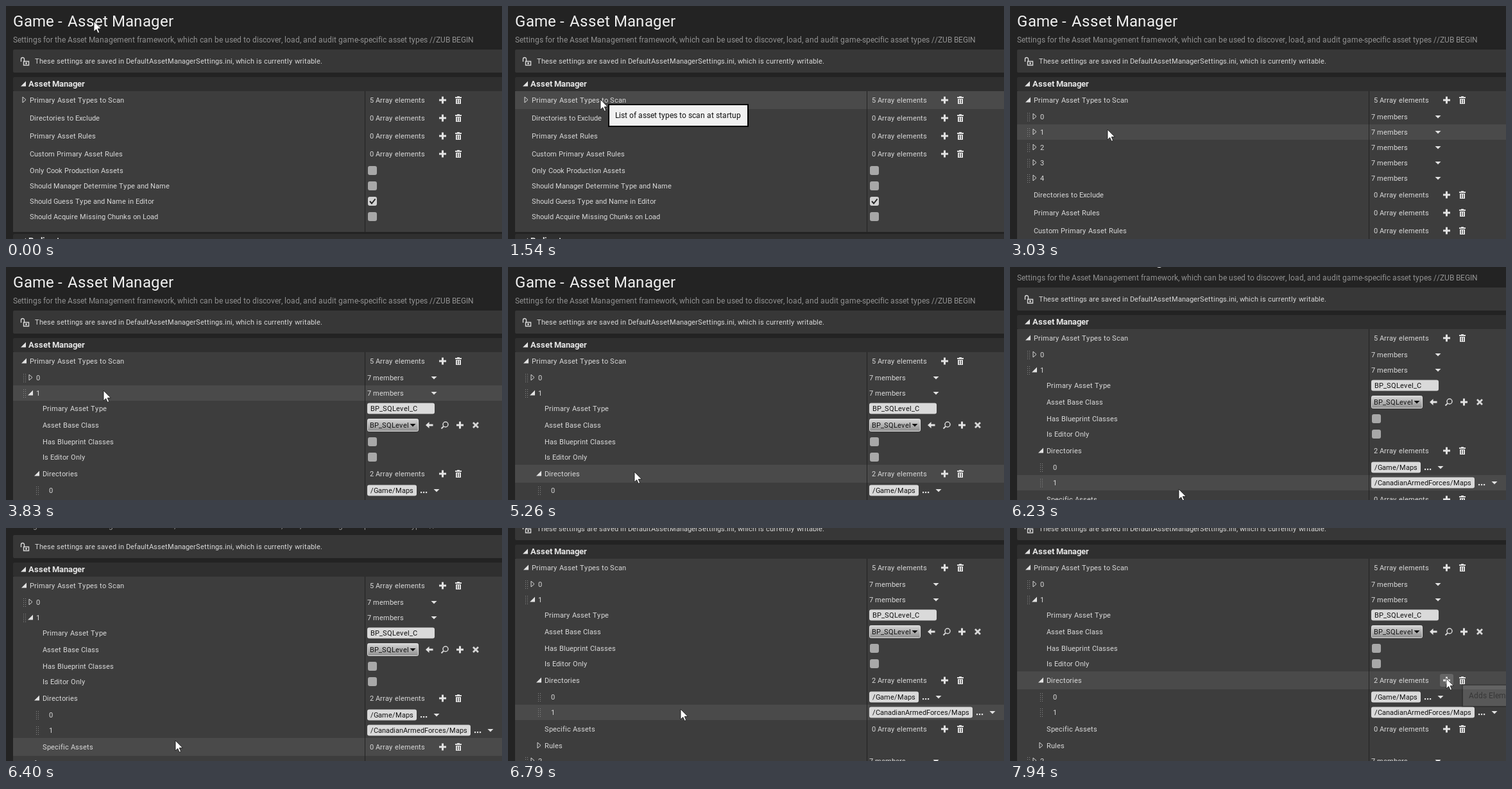
Animation, 773 px wide and 364 px high, one loop 7.99 s. Source, as an HTML page:

```html
<!DOCTYPE html>
<html lang="en">
<head>
<meta charset="utf-8">
<title>Asset Manager settings</title>
<style>
  html, body { margin: 0; width: 100%; height: 100%; overflow: hidden; background: #232323; }
  svg { display: block; }
  text { font: 11px Roboto, sans-serif; fill: #dadada; white-space: pre; }
  .title { font-size: 24px; letter-spacing: .35px; fill: #f0f0f0; }
  .subtitle { font-size: 12px; fill: #929292; }
  .heading { font-size: 13px; font-weight: 700; fill: #e6e6e6; }
  .field, .tip text { fill: #101010; }
  .tip text { font-size: 12px; }
  .icon { fill: #e2e2e2; }
  .line { fill: none; stroke: #d8d8d8; }
  .row > .bg { fill: #3d3d3d; }
  .row.hover > .bg { fill: #4a4a4a; }
</style>
</head>
<body>
<svg width="773" height="364" viewBox="0 0 773 364">
  <defs>
    <linearGradient id="combo" x2="0" y2="1">
      <stop offset="0" stop-color="#d6d6d6"/><stop offset="1" stop-color="#8e8e8e"/>
    </linearGradient>
  </defs>
  <g id="page">
    <text class="title" x="11" y="32">Game -</text>
    <text class="title" x="96" y="32">Asset Manager</text>
    <text class="subtitle" x="11" y="57">Settings for the Asset Management framework, which can be used to discover, load, and audit game-specific asset types //ZUB BEGIN</text>
    <rect x="11" y="68" width="780" height="36" rx="2" fill="#373737"/>
    <path class="line" d="M23.5 87v-4a2.5 2.5 0 0 1 5 0v3M27.5 86.500h8v6h-8z" stroke-width="1.400"/>
    <path class="icon" d="M30.500 88h2v3h-2z"/>
    <text x="45" y="90">These settings are saved in DefaultAssetManagerSettings.ini, which is currently writable.</text>
    <g id="panel"></g>
    <g id="next"></g>
  </g>
  <g id="tips"></g>
  <path id="cursor" d="M0 0V16L3.700 12.500L6.200 18.300L8.600 17.200L6.200 11.600H11.300Z" fill="#fff" stroke="#111" stroke-width=".8"/>
</svg>
<script>
const $ = id => document.getElementById(id);
const LOOP = 7990, TOP = 133;

// Icons and values are drawn around the vertical centre of a row.
const text = (x, s, cls = '') => `<text class="${cls}" x="${x}" y="4">${s}</text>`;
const icon = (d, cls = 'icon') => `<path class="${cls}" d="${d}"/>`;
const plus = x => icon(`M${x - 1.5} -5.500h3v4h4v3h-4v4h-3v-4h-4v-3h4z`);
const trash = x => icon(`M${x - 5} -5h3v-1h4v1h3v2h-10zM${x - 4} -2h8v8h-8z`) +
  `<path d="M${x - 1.5} -1v6M${x + 1.5} -1v6" stroke="#4a4a4a"/>`;
const drop = (x, cls) => icon(`M${x - 4.5} -2h9l-4.500 4.500z`, cls);
const openArrow = x => icon(`M${x} -4.500v8h-8z`);
const shutArrow = x => icon(`M${x - 6} -5v9l5 -4.500z`, 'line');
const grip = x => `<path class="line" d="M${x + .5} -6v13M${x + 3.5} -6v13" style="stroke:#8a8a8a;stroke-dasharray:1 2"/>`;
const box = (x, w, fill, h = 17) =>
  `<rect x="${x}" y="${-h / 2}" width="${w}" height="${h}" rx="3" fill="${fill}"/>`;

const count = n => text(567, `${n} Array elements`) + plus(680.5) + trash(705);
const members = () => text(563, '7 members') + drop(667);
const check = on => box(564, 14, on ? '#d2d2d2' : '#a8a8a8', 14) +
  (on ? '<path d="M567 0l3 3.500l5.500 -7" fill="none" stroke="#222" stroke-width="2"/>' : '');
const field = (s, w) => box(563, w, '#dadada') + text(568, s, 'field');
const folder = (s, w) => field(s, w) +
  [6, 10, 14].map(d => icon(`M${563 + w + d} 2h2.200v2.200h-2.200z`)).join('') + drop(593 + w + 1);
const combo = s => `<rect x="563.5" y="-9.500" width="79" height="19" rx="2" fill="url(#combo)" stroke="#e0e0e0"/>` +
  text(567, s, 'field') + drop(634, 'field') +
  icon('M654 0l5.500 -5v3.500h6v3h-6v3.500z') +
  '<circle class="line" cx="685" cy="-1" r="4" stroke-width="1.500"/>' +
  '<path class="line" d="M682 2l-3.500 3.500" stroke-width="2"/>' + plus(707.5) +
  '<path class="line" d="M728 -4l8 8M736 -4l-8 8" stroke-width="2.800"/>';

// from: level at which the row shows; opens: level at which it unfolds
const row = (h, x, label, value, from = 0, opens, gripX) => ({ h, x, label, value, from, opens, gripX });
const item = (n, opens = 9) => row(24, 47, n, members(), 1, opens, 27);
const rows = [
  row(28, 37, 'Primary Asset Types to Scan', count(5), 0, 1),
  item(0), item(1, 2),
  row(24, 57, 'Primary Asset Type', field('BP_SQLevel_C', 105), 2),
  row(28, 57, 'Asset Base Class', combo('BP_SQLevel'), 2),
  row(24, 57, 'Has Blueprint Classes', check(false), 2),
  row(24, 57, 'Is Editor Only', check(false), 2),
  row(28, 57, 'Directories', '<g id="press">' + box(670, 21, '#666', 20) + '</g>' + count(2), 2, 0),
  row(24, 67, 0, folder('/Game/Maps', 77), 2, undefined, 47),
  row(24, 67, 1, folder('/CanadianArmedForces/Maps', 161), 2, undefined, 47),
  row(28, 57, 'Specific Assets', count(0), 2),
  row(24, 57, 'Rules', '', 2, 9),
  item(2), item(3), item(4),
  row(28, 37, 'Directories to Exclude', count(0)),
  row(28, 37, 'Primary Asset Rules', count(0)),
  row(28, 37, 'Custom Primary Asset Rules', count(0)),
  row(24, 37, 'Only Cook Production Assets', check(false)),
  row(24, 37, 'Should Manager Determine Type and Name', check(false)),
  row(24, 37, 'Should Guess Type and Name in Editor', check(true)),
  row(24, 37, 'Should Acquire Missing Chunks on Load', check(false))
];

const header = (y, s) => `<rect x="11" y="${y}" width="780" height="22" rx="2" fill="#2f2f2f"/>
  <g transform="translate(0 ${y + 11})">${openArrow(31)}</g>
  <text class="heading" x="35" y="${y + 15}">${s}</text>`;
const rowMarkup = r => `<g class="row"><rect class="bg" x="11" y="${-r.h / 2}" width="762" height="${r.h}"/>
  <path d="M559.500 ${-r.h / 2}v${r.h}" stroke="#222"/>
  ${r.gripX ? grip(r.gripX) : ''}
  ${r.opens === undefined ? '' : `<g class="open">${openArrow(r.x - 5)}</g><g class="shut">${shutArrow(r.x - 5)}</g>`}
  ${text(r.x, r.label)}${r.value}</g>`;

$('panel').innerHTML = header(111, 'Asset Manager') + rows.map(rowMarkup).join('');
$('next').innerHTML = `<path d="M11 0h762v12h-762z" fill="#3d3d3d"/><path d="M559.500 0v12" stroke="#222"/>` +
  header(15, 'Redirects');
document.querySelectorAll('.row').forEach((el, i) => {
  rows[i].el = el;
  rows[i].open = el.querySelector('.open');
  rows[i].shut = el.querySelector('.shut');
});

const tips = [
  { x: 156, y: 153, w: 219, s: 'List of asset types to scan at startup', start: 1400, full: 1530, end: 1830 },
  { x: 691, y: 244, w: 150, s: 'Adds Element', start: 7920, full: 8060, end: LOOP }
];
$('tips').innerHTML = tips.map(p => `<g class="tip"><rect x="1" y="1" width="${p.w - 2}" height="34"
  fill="#f1f1f1" stroke="#000" stroke-width="2"/><text x="11" y="22">${p.s}</text></g>`).join('');
document.querySelectorAll('.tip').forEach((el, i) => { tips[i].el = el; });

// Hinted type: every glyph advances by whole pixels, diagonal v and y round up.
const pen = document.createElement('canvas').getContext('2d');
function snapGlyphs(el) {
  const style = getComputedStyle(el);
  const spacing = parseFloat(style.letterSpacing) || 0;
  pen.font = `${style.fontWeight} ${style.fontSize} ${style.fontFamily}`;
  pen.textRendering = 'geometricPrecision';
  let x = +el.getAttribute('x');
  const stops = [...el.textContent].map(ch => {
    const at = x, width = pen.measureText(ch).width + spacing;
    x += 'vy'.includes(ch) ? Math.ceil(width) : Math.round(width);
    return at;
  });
  el.setAttribute('x', stops.join(' '));
}
document.querySelectorAll('text').forEach(snapGlyphs);

// time, x, y
const path = [
  [0, 137, 24], [965, 137, 24], [1380, 144, 146], [2680, 144, 146], [3030, 152, 193],
  [4510, 152, 193], [4920, 144, 315], [5080, 144, 315], [5260, 197, 320], [5305, 197, 320],
  [5840, 245, 316], [5990, 245, 316], [6230, 263, 347], [6285, 263, 347], [6790, 269, 283],
  [6840, 269, 283], [7600, 651, 240], [7650, 651, 240], [7840, 680, 235]
];
const scroll = [[6050, 0], [6230, 36], [6285, 36], [6560, 85]];

function sample(keys, t) {
  const next = keys.findIndex(k => k[0] > t);
  if (next < 1) return keys.at(next).slice(1);
  const a = keys[next - 1], b = keys[next];
  const p = (t - a[0]) / (b[0] - a[0]);
  return a.slice(1).map((v, i) => Math.round(v + (b[i + 1] - v) * p));
}
const move = (el, x, y) => el.setAttribute('transform', `translate(${x} ${y})`);
const show = (el, on) => { el.style.display = on ? '' : 'none'; };

function draw(t) {
  const level = t < 1900 ? 0 : t < 3680 ? 1 : 2;
  const [cx, cy] = sample(path, t);
  const [offset] = sample(scroll, t);
  let y = TOP;
  for (const r of rows) {
    show(r.el, r.from <= level);
    if (r.from > level) continue;
    move(r.el, 0, y + r.h / 2);
    const pointer = cy + offset - y;
    r.el.classList.toggle('hover', pointer >= 0 && pointer < r.h);
    if (r.open) {
      show(r.open, r.opens <= level);
      show(r.shut, r.opens > level);
    }
    y += r.h;
  }
  move($('next'), 0, y);
  move($('page'), 0, -offset);
  move($('cursor'), cx, cy);
  show($('press'), cx >= 670);
  for (const p of tips) {
    const fade = Math.min(1, (t - p.start) / (p.full - p.start));
    show(p.el, fade > 0 && t < p.end);
    p.el.setAttribute('opacity', Math.max(0, fade));
    move(p.el, Math.round(p.x + 15 * (1 - fade)), p.y);
  }
}

const began = performance.now();
function tick() {
  draw((performance.now() - began) % LOOP);
  requestAnimationFrame(tick);
}
tick();
</script>
</body>
</html>
```
